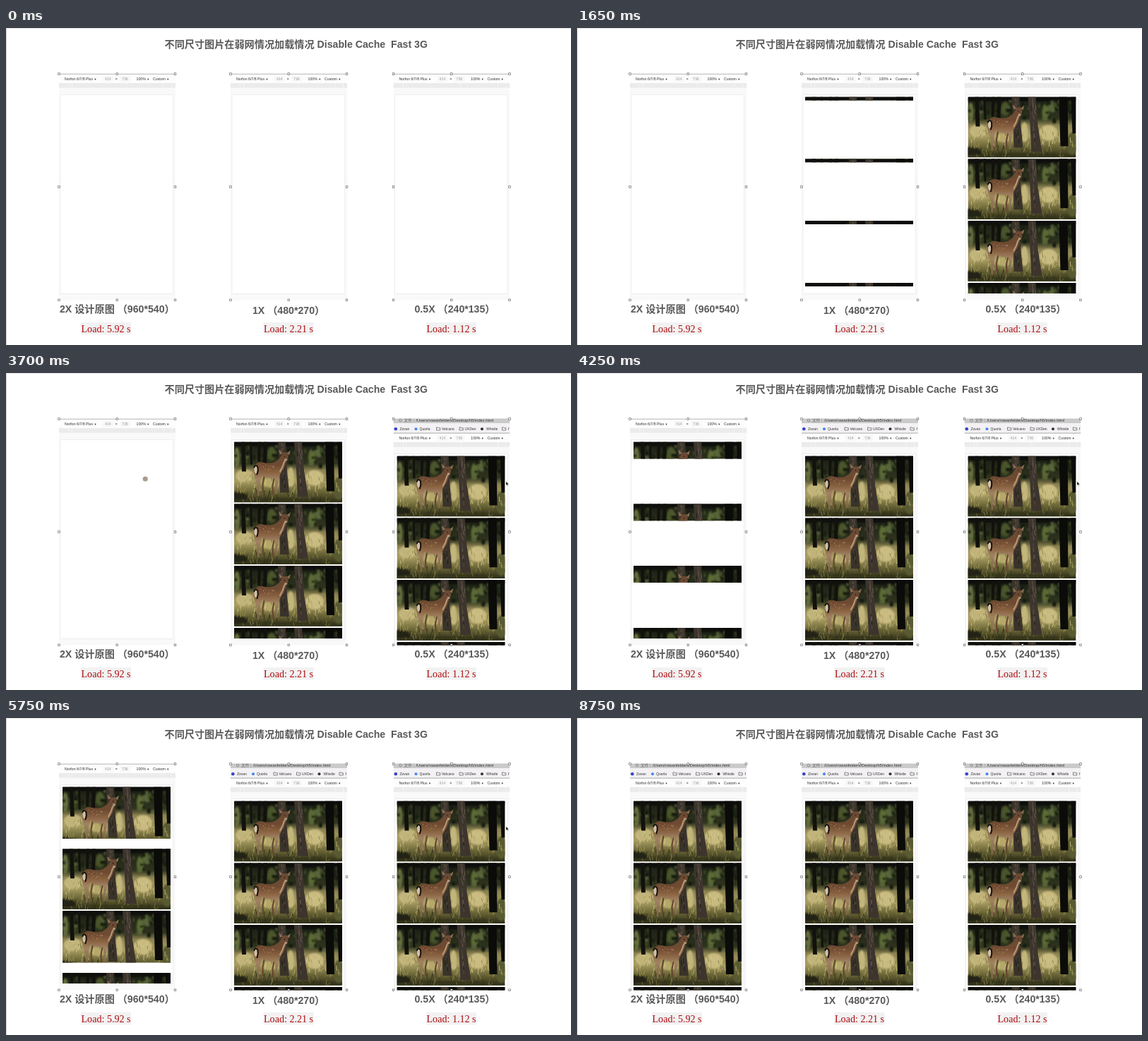
An HTML page for the animation above (8950 ms loop, 800x449 px).

```html
<!DOCTYPE html>
<html lang="zh-CN">
<head>
<meta charset="utf-8">
<style>
  html, body { margin: 0; height: 100%; overflow: hidden; background: #fff; }
  svg { display: block; }
  text { white-space: pre; font-family: "Liberation Sans", "Noto Sans CJK SC", sans-serif; }
  .head { font-size: 14.15px; font-weight: bold; fill: #595959; }
  .load { font: 14.1px "Liberation Serif", serif; fill: #ae0a0e; }
  .ui { font-size: 5.2px; fill: #333; }
  .ui tspan { font-size: 4px; }
</style>
</head>
<body>
<svg id="stage" width="800" height="449" viewBox="0 0 800 449"></svg>
<script>
const LOOP = 8950, PHOTO_W = 153, PHOTO_H = 85.7, PITCH = 87.8;

let seed = 11;
const rnd = (a, b) => {
  seed = (seed * 16807) % 2147483647;
  return +(a + (b - a) * seed / 2147483647).toFixed(1);
};
const pick = list => list[Math.min(list.length - 1, rnd(0, list.length) | 0)];
const many = (n, f) => Array.from({ length: n }, (_, i) => f(i)).join('');
const rect = (x, y, w, h, fill, more = '') =>
  `<rect x="${x}" y="${y}" width="${w}" height="${h}" fill="${fill}" ${more}/>`;
const text = (x, y, s, cls, more = '') => `<text x="${x}" y="${y}" class="${cls}" ${more}>${s}</text>`;
const blob = (x, y, rx, ry, fill) => `<ellipse cx="${x}" cy="${y}" rx="${rx}" ry="${ry}" fill="${fill}"/>`;
const path = (d, fill, more = '') => `<path d="${d}" fill="${fill}" ${more}/>`;
const line = (d, color, w) => path(d, 'none', `stroke="${color}" stroke-width="${w}" stroke-linecap="round"`);
const gradient = (id, stops) =>
  `<linearGradient id="${id}" x2="0" y2="1">${stops.map(([o, c]) =>
    `<stop offset="${o}" stop-color="${c}"/>`).join('')}</linearGradient>`;

// Forest clearing with a deer
function photo() {
  const blades = (n, top, bottom, colors) => many(n, () =>
    line(`M${rnd(0, 153)} ${rnd(top, bottom)}l${rnd(-3, 3)} ${rnd(-8, -3)}`, pick(colors), .8));
  const leaves = many(70, () =>
    blob(rnd(0, 153), rnd(4, 36), rnd(1, 3), rnd(1, 3.5), pick(['#56603a', '#171b0f', '#3c4624', '#10130b'])));
  return `<g id="photo">
    ${rect(0, 0, PHOTO_W, PHOTO_H, 'url(#field)')}
    <g filter="url(#soft)">
      ${blob(4, 22, 4, 14, '#66703c')}${blob(53, 17, 6, 10, '#4a542b')}${blob(110, 22, 5, 12, '#5c6a35')}${blob(120, 14, 6, 8, '#58653a')}
      ${leaves}
      ${blob(15, 48, 13, 9, '#c1b47a')}${blob(80, 50, 5, 14, '#c3b67b')}${blob(114, 51, 13, 11, '#c9bb80')}
      ${blob(50, 58, 12, 6, '#b5a86a')}${blob(148, 66, 8, 16, '#595a30')}${blob(4, 80, 16, 9, '#232413')}
      ${blob(70, 86, 85, 6, '#35351b')}${rect(0, 0, PHOTO_W, 5, '#0a0c07')}
    </g>
    ${blades(110, 48, 72, ['#d6c990', '#a89c5c', '#817a42', '#c0b375'])}
    ${blades(70, 70, 88, ['#2b2c16', '#7a733c', '#48471f', '#989052'])}
    ${path('M10 0h5l2 42h-6zM22 0h3l1 32h-3zM34 0h4l-1 28h-4zM42 0h5l-1 30h-5z', '#12120c')}
    ${path('M62 0H73L75 42 78 72H65L64 40Z', '#3a332a')}
    ${path('M85 0H96L99 40 105 78H90L88 40Z', '#3d352d')}
    ${many(36, () => { const y = rnd(0, 62), x = rnd(0, 1) < .5 ? rnd(65, 72) : rnd(88, 95) + y / 12;
      return line(`M${x} ${y}l.5 ${rnd(3, 8)}`, pick(['#60564b', '#211c17', '#51483e']), 1.1); })}
    ${path('M129 0H141L142 70H131ZM146 0h7v52h-5z', '#0b0b09')}
    ${line('M57 50L54.5 62 55 73M43 47L40.5 60 41 72', '#654730', 2.2)}
    ${path('M28 42C27 32 33 28 40 29C48 31 55 31 60 27C65 24 67 19 69 15L75 15C78 20 77 24 74 28C72 35 69 41 65 46C62 55 61 64 61.5 74L59.5 74L57.5 52C50 52 44 50 39 48C36 57 36 66 35.5 76L33 76L32.5 60C30 54 28 48 28 42Z', 'url(#fur)')}
    ${path('M69 16L63 11 65 18zM75 16L80 12 78 19z', '#8c6d52')}
    ${line('M65 42C68 37 70 32 71 28', '#b79b7b', 2)}
    ${blob(73, 26, 2, 2.2, '#b39a7f')}${blob(74, 27.5, 1, .8, '#21180f')}${blob(71.5, 20.5, .8, .8, '#1c130c')}
    ${blob(31, 39, 2.6, 6, '#d0c1a8')}
    ${line('M28.5 36q2 -5 5 0q1 5 -1 10', '#14100c', 2)}
    ${many(14, () => blob(rnd(36, 57), rnd(33, 41), .5, .5, '#c09c78'))}
  </g>`;
}

// Window contents, placed for the first column and clipped to its frame
function browser(i) {
  const folder = x => path(`M${x} 61v-4h2l.7.8h2.6v3.2z`, 'none', 'stroke="#555" stroke-width=".7"');
  const mark = (x, s) => text(x, 61, s, 'ui', 'style="font-size:5px"');
  const photos = many(4, r =>
    `<svg id="p${i}${r}" x="80" y="${(97.5 + r * PITCH).toFixed(1)}" width="${PHOTO_W}" height="0"><use href="#photo"/></svg>`);
  return `<svg x="75" y="64.5" width="165" height="321" viewBox="75 64.5 165 321"><g id="w${i}">
    ${rect(75, 40, 165, 11, '#cacaca')}
    ${rect(75, 51, 165, 14, '#f3f1f3')}
    <circle cx="85" cy="47" r="1.9" fill="none" stroke="#666" stroke-width=".6"/>
    ${text(90, 49, '文件', 'ui', 'style="font-size:5.7px;fill:#666"')}
    ${rect(103.5, 44, .5, 6, '#999')}
    ${text(107, 49, '/Users/rowanfelders/Desktop/h5/index.html', 'ui', 'style="font-size:5.75px"')}
    <circle cx="78.3" cy="59.2" r="2.3" fill="#3346c8"/>${mark(84, 'Zovan')}
    <circle cx="107" cy="59.2" r="2" fill="#4285f4"/>${mark(112, 'Quorla')}
    ${folder(136)}${mark(143.5, 'Velcano')}${folder(168.5)}${mark(176, 'UXDen')}
    <circle cx="200.5" cy="59.2" r="2" fill="#333"/>${mark(206.5, 'Whistle')}${folder(229)}${mark(237.5, 'f')}
    ${rect(75, 64.5, 165, 13.5, '#fdfdfd')}${rect(75, 64.5, 165, 1.3, '#bcbcbc')}
    ${text(83, 73.6, 'Norfon 6/7/8 Plus <tspan>▼</tspan>', 'ui')}
    ${rect(137, 67.5, 15, 9, '#f8f8f8')}${rect(161, 67.5, 15, 9, '#f8f8f8')}
    ${text(140, 73.6, '414', 'ui', 'style="fill:#999"')}${text(154.6, 73.8, '×', 'ui', 'style="font-size:6px"')}
    ${text(164, 73.6, '736', 'ui', 'style="fill:#999"')}
    ${text(184.5, 73.6, '100% <tspan>▼</tspan>', 'ui')}${text(208, 73.6, 'Custom <tspan>▼</tspan>', 'ui')}
    ${rect(75, 78, 165, 330, '#f9f9f9')}${rect(75, 78, 165, 6.7, '#ebebeb')}
    ${[88.5, 93, 170, 222.5, 234].map(x => rect(x, 78, .7, 6.7, '#f8f8f8')).join('')}
    ${rect(77, 94.5, 159.5, 282, '#fff', 'stroke="#ebebeb" stroke-width=".8"')}
    <svg x="77" y="94" width="160" height="282" viewBox="77 94 160 282">${photos}</svg>
  </g></svg>`;
}

function handles() {
  let out = '';
  for (const x of [75, 157.3, 239.5]) for (const y of [65, 225, 385.3])
    if (x !== 157.3 || y !== 225) out += rect(x - 1.3, y - 1.3, 2.6, 2.6, '#fff', 'stroke="#666" stroke-width=".7"');
  return out;
}

const columns = [
  { dx: 0, x: 76, y: 403, title: '2X 设计原图 （960*540）', lx: 106.5, load: '5.92' },
  { dx: 243, x: 349, y: 405, title: '1X （480*270）', lx: 365, load: '2.21' },
  { dx: 473.5, x: 578.5, y: 403, title: '0.5X （240*135）', lx: 595.5, load: '1.12' }
];

const stage = document.getElementById('stage');
stage.innerHTML = `<defs>
    <filter id="soft" x="0" y="0" width="${PHOTO_W}" height="${PHOTO_H}" filterUnits="userSpaceOnUse"><feGaussianBlur stdDeviation="1.3"/></filter>
    ${gradient('field', [[0, '#0c0e08'], [.1, '#1f2317'], [.36, '#2f341e'], [.47, '#8a8150'], [.65, '#a89d62'], [.82, '#6b6637'], [1, '#2b2b17']])}
    ${gradient('fur', [[0, '#694a34'], [.3, '#6f4a31'], [.45, '#87603f'], [.62, '#a18263'], [1, '#7b6047']])}
    ${photo()}
  </defs>
  ${rect(0, 0, 800, 449, '#fff')}${rect(0, 0, 800, 1, '#e6e2e4')}${rect(0, 0, 1.2, 449, '#dad4d7')}
  ${text(224.5, 28.3, '不同尺寸图片在弱网情况加载情况 Disable Cache  Fast 3G', 'head')}
  ${columns.map((c, i) => `<g transform="translate(${c.dx})">${browser(i)}${handles()}</g>
    ${text(c.x, c.y, c.title, 'head')}${rect(c.lx - .5, 417, 71, 17.5, '#f2f2f2')}
    ${text(c.lx, 431, `Load: ${c.load} s`, 'load')}`).join('')}
  <circle id="touch" r="3.6" fill="#a99c8d"/>
  ${path('M0 0V5.6L1.3 4.5 2.2 6.4 3 6 2.2 4.2H3.9Z', '#000', 'id="cursor" stroke="#fff" stroke-width=".4"')}`;

// Loaded height of the pictures: [time, height]
const loading = [
  [[3850, 5], [4050, 10], [4150, 17], [4250, 24], [4350, 30], [4610, 36], [4800, 43],
   [5400, 50], [5450, 58], [5610, 63], [5700, 68], [5750, 73.5], [6050, 80], [6150, PHOTO_H]],
  [[950, 5], [2400, 24], [2450, 45], [2500, 66], [2550, PHOTO_H]],
  [[950, 5], [1000, 11], [1050, 18], [1300, 52], [1350, PHOTO_H]]
];
const shiftAt = [8750, 3850, 2950];

const el = id => document.getElementById(id);
const height = (keys, t) => keys.reduce((h, [at, v]) => t >= at ? v : h, 0);
const phase = (t, a, b) => {
  const u = Math.min(1, Math.max(0, (t - a) / (b - a)));
  return u * u * (3 - 2 * u);
};
const curve = (u, a, b, c) => a * (1 - u) ** 2 + 2 * b * u * (1 - u) + c * u * u;
function place(id, visible, x, y) {
  el(id).setAttribute('transform', `translate(${x} ${y})`);
  el(id).setAttribute('visibility', visible ? 'visible' : 'hidden');
}

function draw(t) {
  loading.forEach((keys, i) => {
    const h = height(keys, t);
    for (let r = 0; r < 4; r++)
      el(`p${i}${r}`).setAttribute('height', !i && r === 1 && t >= 5610 ? PHOTO_H : h);
    el(`w${i}`).setAttribute('transform', `translate(0 ${t >= shiftAt[i] ? 20 : 0})`);
  });
  const q = Math.floor(t / 50) * 50;
  const come = phase(q, 2350, 2800), go = phase(q, 7500, 8050);
  place('cursor', t >= 2400 && t < 8050,
    go ? curve(go, 708, 480, 218) : 767 - 59 * come,
    go ? curve(go, 153.5, 62, 322) : 392 - 238.5 * come);
  const slide = phase(q, 3250, 3700);
  place('touch', t >= 3300 && t < 3850, 173 + 24.2 * slide, 372 - 222 * slide);
}

function tick(now) {
  draw(now % LOOP);
  requestAnimationFrame(tick);
}
draw(0);
requestAnimationFrame(tick);
</script>
</body>
</html>
```
